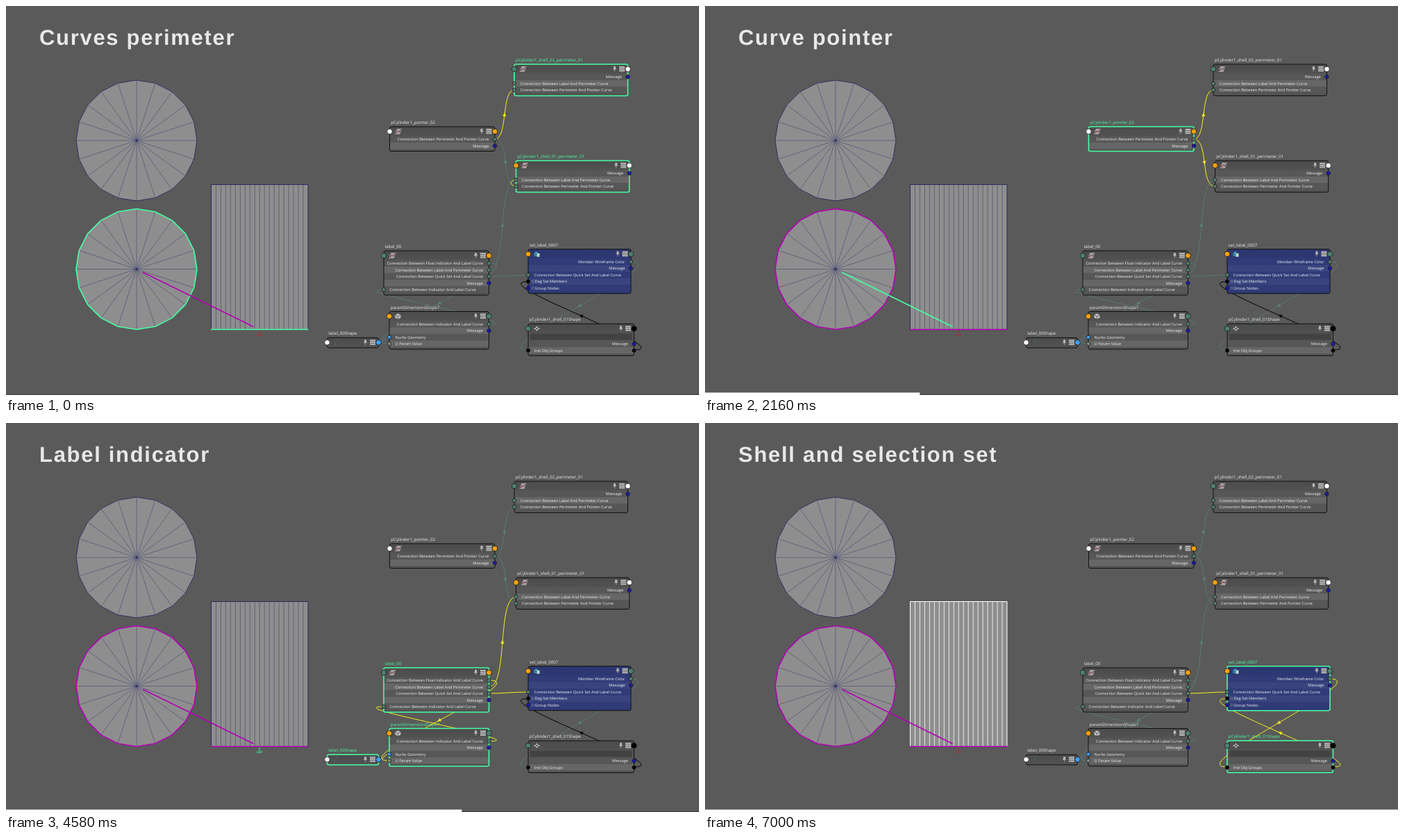
Animation, 998 px wide and 561 px high, one loop 7.05 s. Source, as an HTML page with a canvas:

```html
<!DOCTYPE html>
<html lang="en">
<head>
<meta charset="utf-8">
<title>Curve network</title>
<style>
html, body { margin: 0; width: 100%; height: 100%; overflow: hidden; background: #5a5a5a; }
canvas { display: block; }
</style>
</head>
<body>
<canvas id="stage" width="998" height="561"></canvas>
<script>
const g = document.getElementById('stage').getContext('2d');
const LOOP = 7050, STEP = 52.63;
const UI = '"Open Sans", "Noto Sans", sans-serif';
const GREEN = '#46ffa4', PURPLE = '#b400b6', YELLOW = '#f4f01c', DIM = '#5b8178', NAVY = '#29295f';
const PORT = { g: '#4f7f70', o: '#f8a20c', w: '#ffffff', b: '#1a1ab0', k: '#000000', l: '#3f9ff0', e: '#7c9078' };
const CONN = 'Connection Between ';

const scenes = [
  { title: 'Curves perimeter', nodes: 'AC', wires: ['BA'] },
  { title: 'Curve pointer', nodes: 'B', wires: ['BA', 'BC'] },
  { title: 'Label indicator', nodes: 'DEF', wires: ['DC', 'DE', 'ED', 'FE', 'DG'] },
  { title: 'Shell and selection set', nodes: 'GH', wires: ['DG', 'GH', 'HG'] }
];

// Row: [side, text, left port, right port]; ends: header port colours.
const perimeterRows = [
  ['r', 'Message', '', 'b'],
  ['l', CONN + 'Label And Perimeter Curve', 'g'],
  ['l', CONN + 'Perimeter And Pointer Curve', 'g']
];
const nodes = {
  A: { name: 'pCylinder1_shell_02_perimeter_01', box: [732, 84, 163.5, 45.5], ends: 'gw', icon: curveIcon, rows: perimeterRows },
  B: { name: 'pCylinder1_pointer_02', box: [552.5, 174, 151.5, 35.5], ends: 'wo', icon: curveIcon, rows: [
    ['r', CONN + 'Perimeter And Pointer Curve', '', 'g'],
    ['r', 'Message', '', 'b']] },
  C: { name: 'pCylinder1_shell_01_perimeter_01', box: [734.5, 223, 163.2, 45.5], ends: 'ow', icon: curveIcon, rows: perimeterRows },
  D: { name: 'label_00', box: [544, 353, 151.5, 64], ends: 'go', icon: curveIcon, rows: [
    ['r', CONN + 'Float Indicator And Label Curve', '', 'g'],
    ['r', CONN + 'Label And Perimeter Curve', '', 'g'],
    ['r', CONN + 'Quick Set And Label Curve', '', 'g'],
    ['r', 'Message', '', 'b'],
    ['l', CONN + 'Indicator And Label Curve', 'g']] },
  E: { name: 'paramDimensionShape7', box: [552, 440.5, 143.5, 54.5], ends: 'og', icon: cubeIcon, rows: [
    ['r', CONN + 'Indicator And Label Curve', '', 'g'],
    ['r', 'Message', '', 'b'],
    ['l', 'Nurbs Geometry', 'l'],
    ['l', 'U Param Value', 'e']] },
  F: { name: 'label_00Shape', box: [462.5, 478.3, 74, 14.7], ends: 'wl', icon: waveIcon, rows: [] },
  G: { name: 'set_label_0007', box: [752, 350.7, 148, 64], ends: 'og', icon: setIcon, blue: true, rows: [
    ['r', 'Member Wireframe Color', '', 'g'],
    ['r', 'Message', '', 'b'],
    ['l', CONN + 'Quick Set And Label Curve', 'g'],
    ['l', 'Dag Set Members', 'k', '', '+'],
    ['l', 'Group Nodes', 'b', '', '+']] },
  H: { name: 'pCylinder1_shell_01Shape', box: [752, 458.3, 152.5, 46], ends: 'gk', icon: meshIcon, field: true, rows: [
    ['r', 'Message', '', 'b'],
    ['l', 'Inst Obj Groups', 'k', 'k']] }
};

// Wire: start, end, horizontal reach of the handles, arrow, resting colour.
const wires = {
  BA: [704, 192, 732, 121, 19, 1],
  BC: [704, 192, 734.5, 260, 22, 1],
  DC: [695.5, 380.5, 734.5, 251, 28, 1],
  DE: [695.5, 371, 552, 487, 70, 1],
  ED: [695.5, 459, 544, 409, 70, 0],
  FE: [536.5, 485.5, 552, 477.5, 9, 0, '#5080a0'],
  DG: [695.5, 390, 752, 388, 20, 0],
  GH: [900, 369, 752, 496, 68, 1],
  HG: [904.5, 496, 752, 397.5, 68, 1, '#000']
};

function line(color, width, ...p) {
  g.strokeStyle = color;
  g.lineWidth = width;
  g.beginPath();
  for (let i = 0; i < p.length; i += 2) g.lineTo(p[i], p[i + 1]);
  g.stroke();
}

function fill(color, ...p) {
  g.fillStyle = color;
  g.beginPath();
  for (let i = 0; i < p.length; i += 2) g.lineTo(p[i], p[i + 1]);
  g.fill();
}

function rect(color, x, y, w, h) {
  g.fillStyle = color;
  g.fillRect(x, y, w, h);
}

function text(str, x, y, size, color, align = 'left') {
  g.font = size + 'px ' + UI;
  g.textAlign = align;
  g.fillStyle = color;
  g.fillText(str, x, y);
}

function dot(x, y, r, key) {
  g.beginPath();
  g.arc(x, y, r, 0, 7);
  g.fillStyle = PORT[key];
  g.fill();
  g.strokeStyle = '#1c1c1c';
  g.lineWidth = 0.8;
  g.stroke();
}

function curveIcon(x, y) {
  fill('#a9a3a3', x - 2, y - 4, x + 5, y - 4, x + 2, y + 4, x - 5, y + 4);
  line('#5b3038', 1, x - 4, y + 3, x - 1, y - 1, x + 1, y + 1, x + 4, y - 3);
  line('#b45c68', 0.8, x - 5, y - 1, x - 1, y + 3);
}

function cubeIcon(x, y) {
  fill('#c0c0c0', x, y - 4, x + 4, y - 2, x + 4, y + 2, x, y + 4, x - 4, y + 2, x - 4, y - 2);
  line('#555', 0.9, x - 4, y - 2, x, y, x + 4, y - 2);
  line('#555', 0.9, x, y, x, y + 4);
}

function waveIcon(x, y) {
  g.strokeStyle = '#3d6a78';
  g.lineWidth = 1;
  g.beginPath();
  g.moveTo(x - 3, y + 4);
  g.bezierCurveTo(x + 3, y + 3, x - 4, y - 3, x + 3, y - 4);
  g.stroke();
}

function setIcon(x, y) {
  fill('#3f9bb0', x - 4, y - 1, x - 1, y - 4, x + 2, y - 1, x + 2, y + 3, x - 4, y + 3);
  rect('#b9d8c8', x, y - 1, 4, 5);
  line('#23305c', 0.8, x - 3, y + 1, x, y + 1);
}

function meshIcon(x, y) {
  for (const [dx, dy] of [[0, -2], [2.6, 0], [0, 2], [-2.6, 0]]) {
    const a = x + dx, b = y + dy;
    fill('#d8d8d8', a, b - 1.3, a + 1.6, b, a, b + 1.3, a - 1.6, b);
  }
}

function headerIcons(x, y) {
  rect('#b8b8b8', x - 22, y - 4, 3, 4);
  rect('#b8b8b8', x - 23, y - 0.5, 5, 1);
  line('#b8b8b8', 0.8, x - 20.5, y, x - 20.5, y + 3.5);
  rect('#b4b4b4', x - 14, y - 4, 8, 7.5);
  rect('#666', x - 14, y - 1.8, 8, 0.8);
  rect('#666', x - 14, y + 0.7, 8, 0.8);
}

function drawNode(n, on) {
  const [x, y, w, h] = n.box, r = x + w, mid = y + 7;
  g.save();
  g.beginPath();
  g.roundRect(x, y, w, h, 2.5);
  g.clip();
  const shade = g.createLinearGradient(0, y, 0, y + 14);
  shade.addColorStop(0, n.blue ? '#2c3670' : '#4b4b4b');
  shade.addColorStop(1, n.blue ? '#2d3873' : '#525252');
  rect(shade, x, y, w, h);
  const top = y + (n.field ? 24.3 : 13.5);
  n.rows.forEach((row, i) => {
    const c = n.blue ? ['#303b78', '#39447f'] : ['#575757', '#666666'];
    rect(c[i % 2], x, top + i * 9.45, w, 9.45);
  });
  if (n.field) rect('#424242', x + 3, y + 14.2, w - 6, 9);
  g.restore();

  g.strokeStyle = on ? GREEN : '#101010';
  g.lineWidth = on ? 1.6 : 1;
  g.beginPath();
  g.roundRect(x, y, w, h, 2.5);
  g.stroke();

  n.icon(x + 12.5, mid);
  headerIcons(r + 1.5, mid);
  dot(x, mid, 3.8, n.ends[0]);
  dot(r, mid, 3.8, n.ends[1]);
  n.rows.forEach(([side, str, left, right, mark], i) => {
    const cy = top + 4.7 + i * 9.45;
    if (left) dot(x, cy, 2.7, left);
    if (right) dot(r, cy, 2.7, right);
    if (mark) {
      g.strokeStyle = '#8088a8';
      g.lineWidth = 0.6;
      g.strokeRect(x + 5, cy - 1.5, 3, 3);
    }
    const tx = side === 'r' ? r - 8.6 : x + (mark ? 9.5 : 8.6);
    text(str, tx, cy + 2, 5.67, '#eeeeee', side === 'r' ? 'right' : 'left');
  });
}

function drawWire([x0, y0, x1, y1, reach, arrow, rest], on) {
  const color = on ? YELLOW : rest || DIM;
  g.strokeStyle = color;
  g.lineWidth = on || rest === '#000' ? 1 : 0.8;
  g.beginPath();
  g.moveTo(x0, y0);
  g.bezierCurveTo(x0 + reach, y0, x1 - reach, y1, x1, y1);
  g.stroke();
  if (!arrow) return;
  g.save();
  g.translate((x0 + x1) / 2, (y0 + y1) / 2);
  g.rotate(Math.atan2(2 * (y1 - y0), 2 * (x1 - x0) - 2 * reach));
  fill(color, 3, 0, -2.5, -2.5, -2.5, 2.5);
  g.restore();
}

function disc(cx, cy, edge, width) {
  const ring = [];
  for (let i = 0; i <= 20; i++) {
    const a = i * Math.PI / 10;
    ring.push(cx + 87 * Math.cos(a), cy + 87 * Math.sin(a));
  }
  fill('#8e8e8e', ...ring);
  for (let i = 0; i < 40; i += 2) line('#505078', 0.7, cx, cy, ring[i], ring[i + 1]);
  g.lineJoin = 'round';
  line(edge, width, ...ring);
  g.beginPath();
  g.arc(cx, cy, 1.4, 0, 7);
  g.fillStyle = NAVY;
  g.fill();
}

function drawShapes(s) {
  const edge = s === 0 ? GREEN : PURPLE;
  disc(188, 194, NAVY, 0.9);
  disc(188, 379.5, edge, 1.6);

  const shell = s === 3;
  rect('#8e8e8e', 295.5, 257.5, 139.5, 209);
  for (let i = 1; i < 20; i++) {
    const x = 295.5 + i * 6.975;
    line(shell ? '#f4f4f4' : '#505068', shell ? 0.9 : 0.7, x, 257.5, x, 466.5);
  }
  g.strokeStyle = shell ? '#fff' : NAVY;
  g.lineWidth = 1;
  g.strokeRect(295.5, 257.5, 139.5, 209);
  line(edge, 1.6, 295, 466.5, 435.5, 466.5);
  line(s === 1 ? GREEN : PURPLE, 1.6, 197, 384, 356.5, 462.5);

  const mark = s === 2 ? GREEN : '#b8282c';
  line(mark, 0.8, 365, 467.5, 365, 476.5);
  text('u e', 365, 476, 6, mark, 'center');
}

function draw(now) {
  const t = now % LOOP;
  const k = Math.floor((t + 5) / STEP);
  const s = k < 34 ? 0 : k < 67 ? 1 : k < 101 ? 2 : 3;
  const scene = scenes[s];

  rect('#5a5a5a', 0, 0, 998, 561);
  g.textRendering = 'geometricPrecision';
  g.font = 'bold 31px "Liberation Sans", Arial, sans-serif';
  g.letterSpacing = '1.7px';
  g.textAlign = 'left';
  g.fillStyle = '#e8e8e8';
  g.fillText(scene.title, 48, 56);
  g.letterSpacing = '0px';

  drawShapes(s);

  const isOn = id => scene.nodes.includes(id);
  for (const id in nodes) {
    const { name, box } = nodes[id];
    text(name, box[0] + 1.8, box[1] - 4, 6.1, isOn(id) ? GREEN : '#eeeeee');
  }
  for (const id in wires) drawWire(wires[id], scene.wires.includes(id));
  if (s === 0) {
    g.strokeStyle = YELLOW;
    g.lineWidth = 0.9;
    g.beginPath();
    g.moveTo(734, 250.5);
    g.bezierCurveTo(725, 252, 725, 258, 734, 260.5);
    g.stroke();
  }
  for (const id in nodes) drawNode(nodes[id], isOn(id));

  rect('#3a3a3a', 0, 560, 998, 1);
  rect('#ffffff', 0, 557.5, Math.min(998, k * 7.545), 3.5);
}

let start;
function tick(now) {
  if (start === undefined) start = now;
  draw(now - start);
  requestAnimationFrame(tick);
}
draw(0);
requestAnimationFrame(tick);
</script>
</body>
</html>
```
